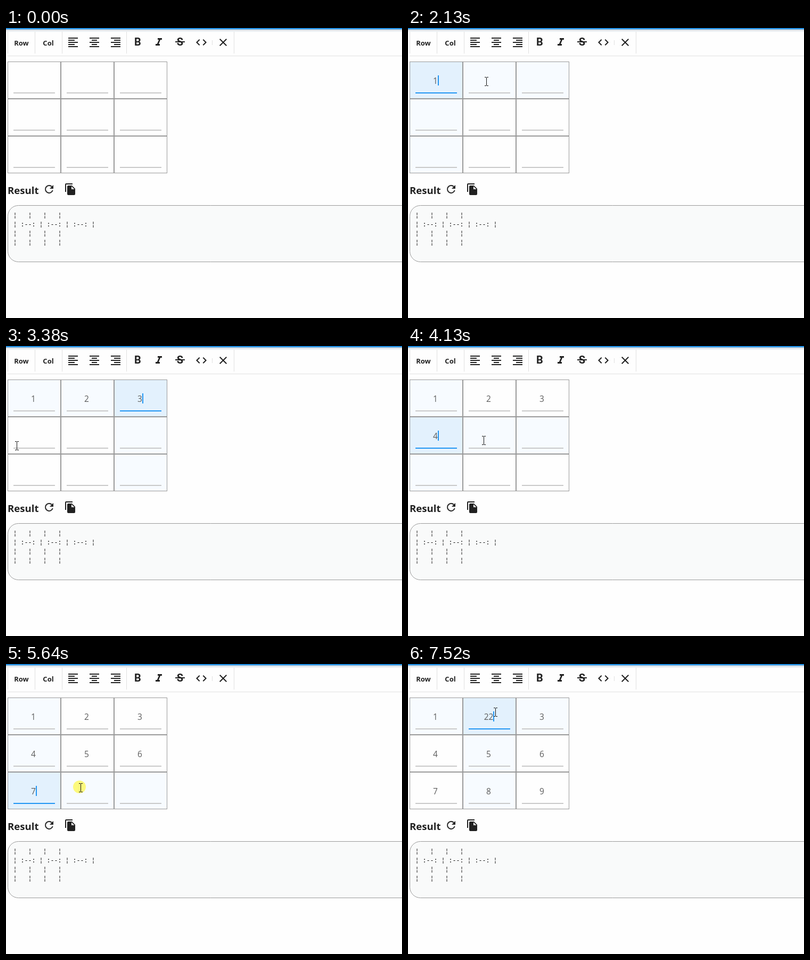
Recreate the animation shown at these times as an HTML page with a canvas. Size 744 by 545 pixels, loop 8 s.

```html
<!DOCTYPE html>
<html lang="en">
<head>
<meta charset="utf-8">
<title>Table editor</title>
<style>
  html, body { margin: 0; width: 100%; height: 100%; overflow: hidden; background: #fefefe; }
  canvas { display: block; }
</style>
</head>
<body>
<canvas id="stage" width="744" height="545"></canvas>
<script>
const ctx = document.getElementById('stage').getContext('2d');
const LOOP = 8000, TICK = 125.2;
const LEFT = 3, TOP = 63, CELL_W = 100, CELL_H = 70;
const PAPER = '#fefefe', INK = '#212121', RULE = '#e0e0e0', BLUE = '#2196f3';
const SANS = '"Open Sans", "Noto Sans", sans-serif';

// Each click focuses the cell under it on the next tick; its digit is typed one tick later.
const clicks = [
  [12, 58, 93], [19, 147, 100], [22, 232, 102], [28, 20, 187], [34, 142, 177],
  [37, 241, 186], [41, 50, 235], [45, 140, 232], [49, 225, 222], [57, 164, 90]
].map(([press, x, y]) => ({
  press, x, y, focus: press + 1, key: press + 2,
  col: Math.floor((x - LEFT) / CELL_W), row: Math.floor((y - TOP) / CELL_H)
}));
const entry = { x: 545, y: 480, key: 1 };

function box(x, y, w, h, color) {
  ctx.fillStyle = color;
  ctx.fillRect(x, y, w, h);
}

function text(value, x, y, font, color = INK, align = 'left') {
  ctx.font = font;
  ctx.textAlign = align;
  ctx.fillStyle = color;
  ctx.fillText(value, x, y);
}

// Outlines and solids are drawn on a 24 px icon grid.
function icon(x, y, outline, solid = '') {
  ctx.save();
  ctx.translate(x, y);
  ctx.lineWidth = 2;
  ctx.strokeStyle = ctx.fillStyle = INK;
  ctx.stroke(new Path2D(outline));
  ctx.fill(new Path2D(solid), 'evenodd');
  ctx.restore();
}

function drawToolbar() {
  const shadow = ctx.createLinearGradient(0, 2, 0, 8);
  shadow.addColorStop(0, '#c9d3dc');
  shadow.addColorStop(1, PAPER);
  box(0, 2, 744, 6, shadow);
  box(0, 0, 744, 2.5, '#228fe2');
  for (const x of [3, 54, 105, 226, 428]) box(x, 7, 1, 41, RULE);
  box(387, 23, 1, 9, RULE);
  box(3, 52, 741, 1, RULE);
  text('Row', 29, 33, `bold 13px ${SANS}`, INK, 'center');
  text('Col', 79.5, 33, `bold 13px ${SANS}`, INK, 'center');

  for (let align = 0; align < 3; align++) {
    for (let i = 0; i < 5; i++) {
      const width = i % 2 ? (align === 1 ? 10 : 12) : 18;
      box(117 + 40 * align + (18 - width) * align / 2, 18 + 4 * i, width, 2, INK);
    }
  }
  text('B', 241, 33, 'bold 20px Roboto, sans-serif');
  icon(275, 15, '', 'M10 4v3h2.2l-3.4 8H6v3h8v-3h-2.2l3.4-8H18V4z');
  text('S', 327, 33, 'bold 20px Roboto, sans-serif', INK, 'center');
  box(318, 25, 18, 2, INK);
  icon(355, 15, 'M8.7 6.7 3.4 12l5.3 5.3M15.3 6.7l5.3 5.3-5.3 5.3');
  icon(396, 15, 'M5.7 5.7l12.6 12.6M18.3 5.7 5.7 18.3');
}

function drawResult() {
  text('Result', 3, 312, `bold 18.6px ${SANS}`);
  icon(69, 291, 'M17 7A7 7 0 1 0 18.7 14', 'M13 11h7V4z');
  icon(109, 291, 'M16 2H4a1 1 0 0 0-1 1v14',
    'M15 5l6 6v10a2 2 0 0 1-2 2H8a2 2 0 0 1-2-2V7a2 2 0 0 1 2-2zm-1 7h5.5L14 6.5z');

  ctx.beginPath();
  ctx.roundRect(3.5, 333.5, 780, 106, 20);
  ctx.fillStyle = '#f9fafa';
  ctx.fill();
  ctx.strokeStyle = '#999';
  ctx.stroke();
  const blank = '¦   ¦   ¦   ¦';
  [blank, '¦ :--: ¦ :--: ¦ :--: ¦', blank, blank].forEach((line, i) =>
    text(line, 13.5, 356 + 17 * i, '11.63px "DejaVu Sans Mono", monospace', '#111'));
}

function drawCell(col, row, tick, current, previous) {
  const x = LEFT + CELL_W * col, y = TOP + CELL_H * row;
  const isHere = click => click?.col === col && click.row === row;
  const active = isHere(current);
  const crossed = current && (current.col === col || current.row === row);
  const fresh = current?.focus === tick;
  const accent = fresh ? '#4a90cc' : BLUE;

  box(x, y, CELL_W, CELL_H, active ? '#e3f1fd' : crossed ? '#f7fbff' : PAPER);
  ctx.strokeStyle = '#999';
  ctx.strokeRect(x + .5, y + .5, CELL_W - 1, CELL_H - 1);
  const fading = fresh && isHere(previous);
  box(x + 11, y + 58, 78, 2, active ? accent : fading ? '#85aaca' : '#c9c9c9');

  const typed = clicks.filter(c => isHere(c) && c.key <= tick).length;
  text(String(1 + col + 3 * row).repeat(typed), x + 48.5, y + 42, `15.5px ${SANS}`, '#5c5c5c', 'center');
  if (active) {
    const idle = tick - (current.key <= tick ? current.key : current.focus);
    if (idle % 8 < 5) box(Math.floor(x + 49 + typed * 4.3), y + 26, 2, 19, accent);
  }
}

function drawTable(tick) {
  const focused = clicks.filter(c => c.focus <= tick);
  for (let i = 0; i < 9; i++) {
    drawCell(i % 3, Math.floor(i / 3), tick, focused.at(-1), focused.at(-2));
  }
}

// After each digit the pointer glides to the next click within three ticks.
function pointerAt(tick) {
  const stops = [entry, ...clicks];
  const i = stops.findLastIndex(s => s.key <= tick);
  const from = stops[i], to = stops[i + 1] ?? from;
  const duration = Math.min(3, to.press - from.key) || 1;
  const f = Math.min(1, (tick - from.key) / duration);
  const eased = 1 - (1 - f) ** 2;
  return [from.x, from.y].map((v, axis) => Math.round(v + ((axis ? to.y : to.x) - v) * eased));
}

function drawPointer(tick) {
  if (tick < entry.key) return;
  const [x, y] = pointerAt(tick);
  if (clicks.some(c => c.press === tick)) {
    ctx.beginPath();
    ctx.arc(x - 2, y - 1, 12, 0, 2 * Math.PI);
    ctx.fillStyle = '#fcf97c';
    ctx.fill();
  }
  if (x > LEFT + 3 * CELL_W || y > TOP + 3 * CELL_H) {
    const arrow = new Path2D(`M${x + .5} ${y + .5}v16l4-4 3 6 2-1-3-6h5z`);
    ctx.fillStyle = '#fff';
    ctx.fill(arrow);
    ctx.strokeStyle = '#000';
    ctx.stroke(arrow);
    return;
  }
  const color = clicks.some(c => c.focus === tick) ? '#5f7c90' : '#111';
  box(x, y - 7, 1, 15, color);
  for (const edge of [y - 8, y + 8]) {
    box(x - 3, edge, 3, 1, color);
    box(x + 1, edge, 3, 1, color);
  }
}

function frame(now) {
  const tick = Math.floor((now % LOOP + 2) / TICK);
  box(0, 0, 744, 545, PAPER);
  drawToolbar();
  drawResult();
  drawTable(tick);
  drawPointer(tick);
  requestAnimationFrame(frame);
}
requestAnimationFrame(frame);
</script>
</body>
</html>
```
